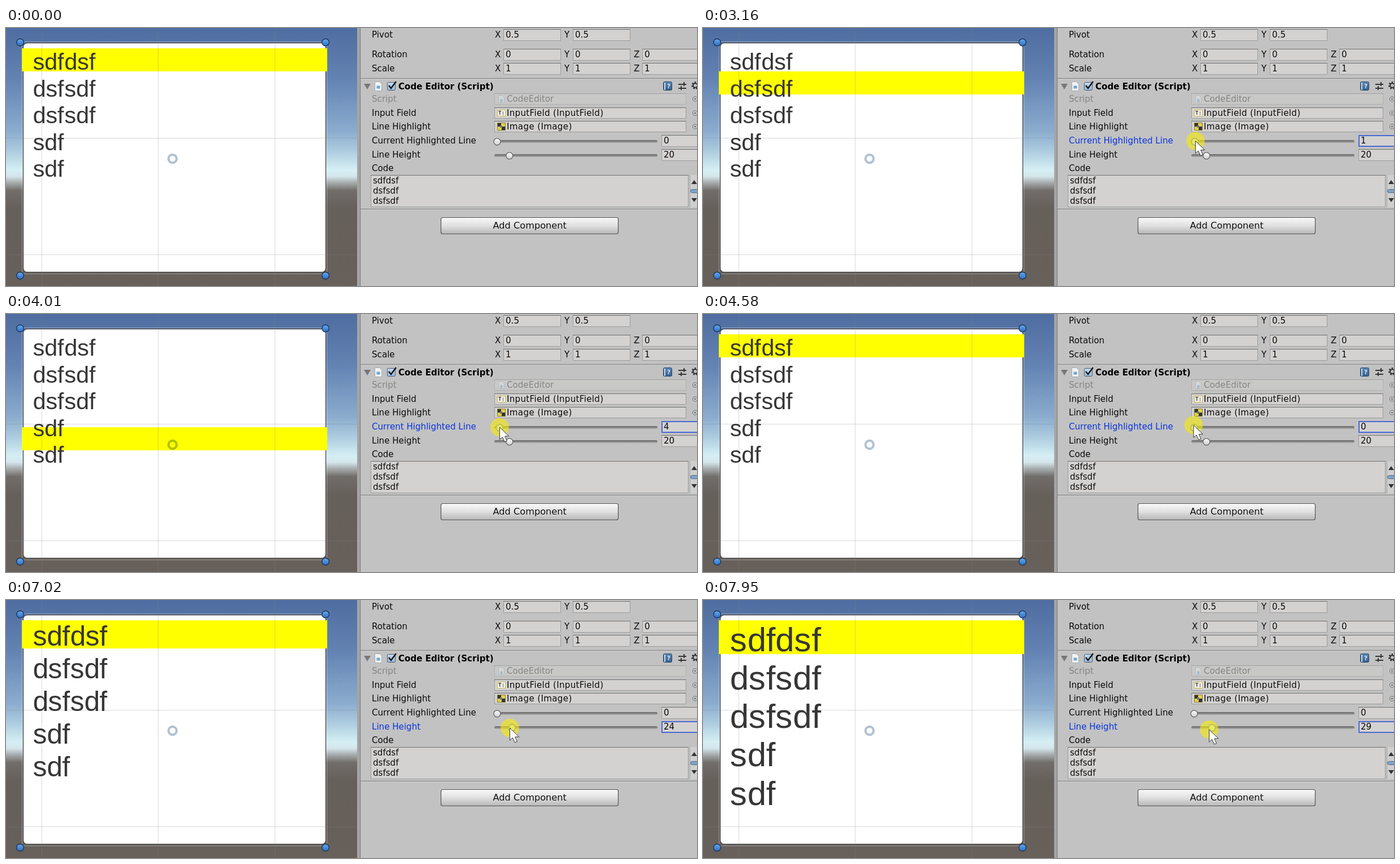
Write an HTML page with a canvas that moves like this. It is 1224 by 458 pixels and loops after 8 s.

```html
<!DOCTYPE html>
<html lang="en">
<head>
<meta charset="utf-8">
<title>Line highlight</title>
<style>
html, body { margin: 0; width: 1224px; height: 458px; overflow: hidden; }
canvas { display: block; }
</style>
</head>
<body>
<canvas id="stage" width="1224" height="458"></canvas>
<script>
const g = document.getElementById('stage').getContext('2d');
const LOOP = 8000;
const UNIT = 2.067; // screen pixels per scene unit
const UI = '15.1px "DejaVu Sans", sans-serif';
const CODE = '"Liberation Sans", Arial, sans-serif';
const LINES = ['sdfdsf', 'dsfsdf', 'dsfsdf', 'sdf', 'sdf'];

// The pointer drives everything: it drags the first slider, then the second.
const path = [[980, 1053, 408], [1680, 853, 197], [1900, 853, 197], [1920, 869, 202],
  [2300, 871, 199], [3010, 871.2, 200], [3550, 875.4, 202], [4000, 875.4, 202],
  [4010, 874.4, 201], [4260, 874, 201], [4740, 866.5, 195.5], [5040, 866.5, 195.5],
  [5900, 887, 224], [6290, 889, 226], [7020, 892.4, 227], [7490, 898.2, 230],
  [7940, 898.2, 230], [7950, 896.6, 230]];
const lineDrag = { down: 2470, up: 4890, grab: 871.2, from: 0 };
const heightDrag = { down: 6220, up: LOOP, grab: 889, from: 20 };

function pointerAt(t) {
  const i = path.findIndex(p => p[0] > t);
  if (i === 0) return null;
  const b = path.at(i), a = i < 0 ? b : path[i - 1];
  const k = a === b ? 0 : (t - a[0]) / (b[0] - a[0]);
  return { x: a[1] + (b[1] - a[1]) * k, y: a[2] + (b[2] - a[2]) * k };
}

function held(drag, t) {
  return t >= drag.down && t < drag.up;
}

function dragged(drag, t) {
  if (!held(drag, t)) return drag.from;
  return drag.from + Math.max(0, Math.round((pointerAt(t).x - drag.grab) * 1.2));
}

function rect(x, y, w, h, fill) {
  g.fillStyle = fill;
  g.fillRect(x, y, w, h);
}

function text(s, x, y, color = '#0b0b0b', font = UI, spacing = 0) {
  g.font = font;
  g.fillStyle = color;
  g.letterSpacing = spacing + 'px';
  g.fillText(s, x, y);
  g.letterSpacing = '0px';
}

// Scene text: advances snap to whole scene units
function codeText(s, x, y, n) {
  for (const c of s) {
    text(c, x, y, '#363636', n * UNIT + 'px ' + CODE);
    g.font = n + 'px ' + CODE;
    x += Math.round(g.measureText(c).width) * UNIT;
  }
}

function vertical(y0, y1, ...stops) {
  const v = g.createLinearGradient(0, y0, 0, y1);
  stops.forEach(([at, c]) => v.addColorStop(at, c));
  return v;
}

function paint(fill, stroke, width) {
  if (fill) { g.fillStyle = fill; g.fill(); }
  if (stroke) { g.strokeStyle = stroke; g.lineWidth = width; g.stroke(); }
}

function poly(points, fill, stroke, width = 1) {
  g.beginPath();
  points.forEach(([x, y]) => g.lineTo(x, y));
  g.closePath();
  paint(fill, stroke, width);
}

function circle(x, y, r, fill, stroke, width = 1) {
  g.beginPath();
  g.arc(x, y, r, 0, 7);
  paint(fill, stroke, width);
}

function box(x, y, w, h, r, fill, stroke, width = 1) {
  g.beginPath();
  g.roundRect(x, y, w, h, r);
  paint(fill, stroke, width);
}

function field(x, y, w, h, focus) {
  box(x + .5, y + .5, w - 1, h - 1, 0, '#d4d2d1', '#9b9b9b');
  rect(x, y, w, 1, '#6f6f6f');
  if (focus) box(x + 1, y + 1, w - 2, h - 2, 0, null, '#4a67d6', 2);
}

function page(x, y, w, h) {
  poly([[x, y], [x + w - 4, y], [x + w, y + 4], [x + w, y + h], [x, y + h]], '#f1f3f5', '#a5adb3');
  rect(x + 3, y + 7, w - 6, 5, '#6fa8d2');
}

function scene(line, n) {
  rect(0, 0, 622, 458, vertical(0, 458, [0, '#4f6da0'], [.2, '#6383b3'], [.4, '#8bacce'],
    [.48, '#aecde0'], [.55, '#d5eff4'], [.575, '#d3e6eb'], [.6, '#a6abac'], [.63, '#716d6a'],
    [.7, '#66605b'], [1, '#68605a']));
  box(28.5, 24.5, 540, 412, 3, null, 'rgba(235,240,245,.4)');
  box(30.5, 26.5, 536, 407, 7, '#fff', '#4a4a4a', 1.4);

  const size = n * UNIT;
  rect(28, Math.round(36 + line * size), 541, Math.round(size), '#ff0');
  for (let i = 0; i < 3; i++) rect(63 + i * 206.5 | 0, 0, 1, 458, 'rgba(125,130,135,.3)');
  for (let i = 0; i < 2; i++) rect(0, 195 + i * 207, 622, 1, 'rgba(125,130,135,.3)');

  const pitch = Math.round(n * 1.149) * UNIT;
  g.filter = 'blur(.5px)';
  LINES.forEach((s, i) => codeText(s, 47.7, 36.6 + size * .905 + i * pitch, n));
  g.filter = 'none';

  g.globalCompositeOperation = 'multiply';
  circle(295, 232, 7.2, null, '#b0c1d3', 4);
  g.globalCompositeOperation = 'source-over';
  for (const x of [25, 566])
    for (const y of [25.5, 439.5]) {
      circle(x, y, 6.3, vertical(y - 6, y + 6, [0, '#66a9ee'], [1, '#2c70c6']), '#1d3558', 1.4);
    }
}

function transform() {
  const rows = [['Pivot', 2, '0.5', '0.5'], ['Rotation', 37, '0', '0', '0'], ['Scale', 62, '1', '1', '1']];
  for (const [label, y, ...values] of rows) {
    text(label, 648, y + 15);
    values.forEach((v, i) => {
      const x = 866 + i * 123;
      text('XYZ'[i], x, y + 15);
      field(x + 15, y, 102, 21);
      text(v, x + 19, y + 15);
    });
  }
}

function rule(y) {
  rect(628, y, 596, 1, '#777');
  rect(628, y + 1, 596, 1, '#d4d4d4');
}

function header() {
  rule(89);
  poly([[634, 99], [646, 99], [640, 109]], '#777');
  page(653.5, 95.5, 12, 16);
  box(675.5, 96.5, 14, 14, 2, vertical(96, 111, [0, '#c5dcf1'], [1, '#91b8df']), '#4a5a6c');
  g.beginPath();
  g.moveTo(678, 102);
  g.lineTo(682, 107);
  g.lineTo(691, 95);
  paint(null, '#111', 2.4);
  text('Code Editor (Script)', 695, 109, '#000', 'bold ' + UI);

  box(1164.5, 95.5, 15, 15, 2, vertical(95, 111, [0, '#5e8ab8'], [1, '#345d8b']), '#29425f');
  rect(1166, 97, 2, 13, '#c9dbea');
  text('?', 1171, 107, '#dfe9f3', 'bold 10px "DejaVu Sans", sans-serif');
  for (const [x, y] of [[1200, 99], [1195, 106]]) {
    rect(1191, y, 14, 2, '#333');
    rect(x, y - 3, 2, 7, '#333');
  }
  g.setLineDash([2.5, 2.2]);
  circle(1221, 102, 5.4, null, '#333', 3);
  g.setLineDash([]);
  circle(1221, 102, 3.8, null, '#333', 2);
}

function reference(label, value, y, spacing, color) {
  text(label, 648, y + 15, color);
  field(865, y, 340, 20);
  text(value, 887, y + 15, color, UI, spacing);
  circle(1220.5, y + 10, 4.2, null, '#777');
  circle(1220.5, y + 10, 1.3, '#666');
}

function references() {
  reference('Script', '', 116, 0, '#858585');
  page(872.5, 119.5, 10, 13);
  rect(865, 116, 340, 20, 'rgba(194,194,194,.6)');
  text('CodeEditor', 887, 131, '#858585');

  reference('Input Field', 'InputField (InputField)', 141, .3);
  box(870.5, 145.5, 14, 11, 0, '#f5f5ee', '#cdb64f');
  text('T', 872, 154, '#444', 'bold 8px "DejaVu Sans", sans-serif');
  rect(880, 148, 1, 7, '#666');

  reference('Line Highlight', 'Image (Image)', 165, .35);
  box(870.5, 168.5, 14, 13, 0, '#e2d24b', '#877b24');
  rect(871, 169, 6, 6, '#333');
  rect(878, 175, 6, 6, '#333');
  rect(875, 173, 4, 4, '#777');
}

function slider(label, y, value, focus) {
  text(label, 648, y + 5, focus ? '#0a35dc' : '#0b0b0b');
  box(865, y - 1, 289, 5, 2.5, vertical(y - 1, y + 4, [0, '#666'], [.5, '#858585'], [1, '#b0b0b0']));
  circle(870 + value * 1.09, y + 1.8, 6,
    focus ? '#dce7fa' : vertical(y - 4, y + 8, [0, '#fafafa'], [1, '#d0d0d0']),
    focus ? '#5377c8' : '#656565', focus ? 1.8 : 1.3);
  field(1161, y - 10, 70, 21, focus);
  text(value, 1165, y + 5);
}

function codeArea() {
  text('Code', 648, 254);
  field(646, 261, 563, 57);
  LINES.slice(0, 3).forEach((s, i) => text(s, 650, 276 + i * 18));
  rect(1211, 261, 13, 57, '#cfcfcf');
  rect(1211, 261, 1, 57, '#a4a4a4');
  poly([[1214, 277], [1224, 277], [1219, 270]], '#333');
  poly([[1214, 302], [1224, 302], [1219, 309]], '#333');
  box(1212.5, 286.5, 14, 6, 3, '#7fa3c8', '#506d8c');
  rule(321);
}

function addButton() {
  box(770.5, 336.5, 314, 29, 3, vertical(336, 366, [0, '#fafafa'], [.5, '#e0e0e0'], [1, '#b5b5b5']), '#555', 1.2);
  g.textAlign = 'center';
  text('Add Component', 927.7, 356, '#111', '16.2px "DejaVu Sans", sans-serif');
  g.textAlign = 'left';
}

function pointer({ x, y }, pressed) {
  if (pressed) circle(x, y, 16.3, 'rgba(245,235,10,.62)');
  const arrow = [[0, 0], [0, 22], [5, 17.5], [9, 26], [13, 24.3], [9.3, 16], [16.3, 16]];
  poly(arrow.map(([dx, dy]) => [x + dx, y + dy]), '#fff', '#333');
}

function draw(now) {
  const t = now % LOOP;
  const line = dragged(lineDrag, t);
  const height = dragged(heightDrag, t);
  const heightFocus = t >= heightDrag.down;

  scene(line, height);
  rect(622, 0, 5, 458, '#a5a5a5');
  rect(627, 0, 597, 458, '#c2c2c2');
  rect(627, 0, 1, 458, '#777');
  transform();
  header();
  references();
  slider('Current Highlighted Line', 200, line, t >= lineDrag.down && !heightFocus);
  slider('Line Height', 225, height, heightFocus);
  codeArea();
  addButton();

  const p = pointerAt(t);
  if (p) pointer(p, held(lineDrag, t) || held(heightDrag, t));
}

const start = performance.now();
function tick() {
  draw(performance.now() - start);
  requestAnimationFrame(tick);
}
tick();
</script>
</body>
</html>
```
